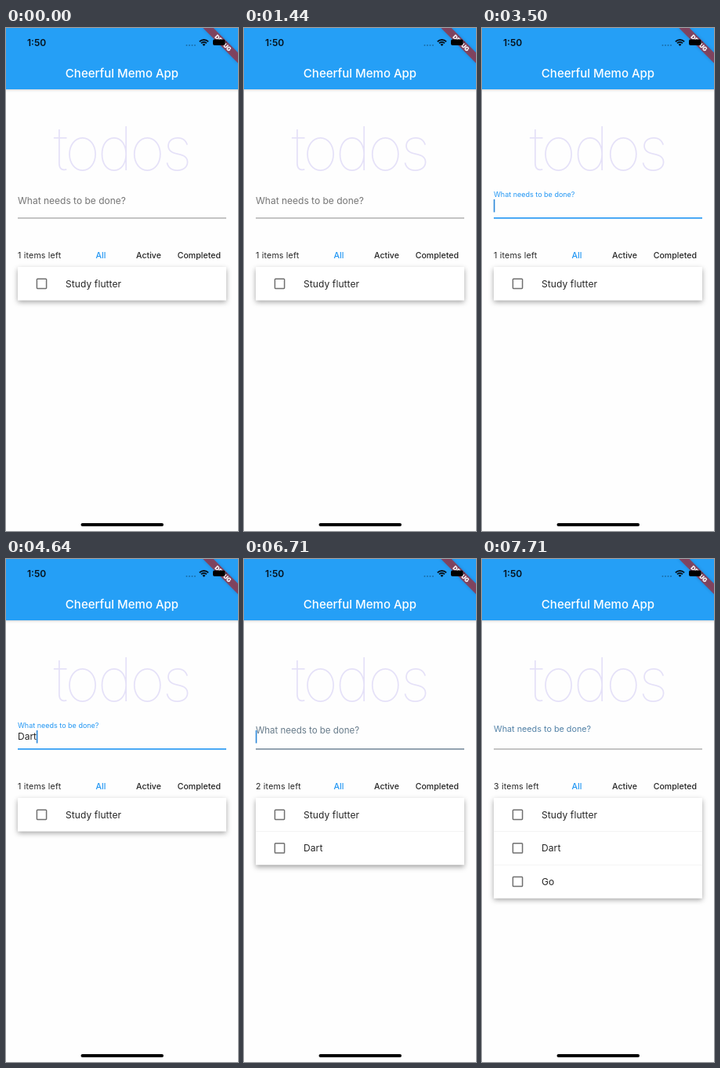
Write an HTML page with a canvas that moves like this. It is 296 px wide and 640 px high and loops after 8000 ms.

```html
<!DOCTYPE html>
<html lang="en">
<head>
<meta charset="utf-8">
<title>Todo list</title>
<style>
  html, body { margin: 0; width: 100%; height: 100%; overflow: hidden; }
  canvas { display: block; width: 296px; height: 640px; }
</style>
</head>
<body>
<canvas id="stage" width="296" height="640"></canvas>
<script>
const ctx = document.getElementById('stage').getContext('2d');
const LOOP = 8000, LEFT = 15, RIGHT = 281, ROW = 42.6, LIST_TOP = 304;
const BLUE = '#2196f3', BAR = '#259ff6', INK = '#252525';
const tasks = ['Study flutter', 'Dart', 'Go'];

// Stepped tracks: [start time, value held until the next entry]
const taskCount = [[0, 1], [500, 0], [1440, 1], [5010, 2], [7600, 3]];
const focused = [[0, 0], [2200, 1], [5010, 0], [6710, 1], [7600, 0]];
const labelLift = [[0, 0], [2200, .36], [2310, .92], [2780, 1], [5010, .5], [5130, 0],
                   [6710, .17], [6820, .74], [7110, 1], [7600, .9], [7710, .4]];
const caretAlpha = [[0, 0], [2200, 1], [2780, .7], [2890, .35], [2990, 0], [3290, .3],
                    [3400, .65], [3500, 1], [3800, .7], [3910, .35], [4010, 0], [4270, 1],
                    [5010, 0], [6710, 1], [7600, 0]];
const typed = [[0, ''], [4270, 'Da'], [4430, 'Dar'], [4640, 'Dart'], [5010, ''],
               [7110, 'G'], [7360, 'Go'], [7600, '']];

const at = (track, t) => track.findLast(([start]) => start <= t)[1];
const clamp = v => Math.min(1, Math.max(0, v));

// Grey to blue
function focusColor(grey, k) {
  return `rgb(${[33, 150, 243].map(v => Math.round(grey + (v - grey) * k)).join()})`;
}

function box(x, y, w, h, color) {
  ctx.fillStyle = color;
  ctx.fillRect(x, y, w, h);
}

function pill(x, y, w, h, r, color) {
  ctx.fillStyle = color;
  ctx.beginPath();
  ctx.roundRect(x, y, w, h, r);
  ctx.fill();
}

function text(str, x, y, size, color, { weight = 400, align = 'left', spacing = 0 } = {}) {
  ctx.font = `${weight} ${size}px Inter, sans-serif`;
  ctx.letterSpacing = spacing + 'px';
  ctx.textAlign = align;
  ctx.fillStyle = color;
  ctx.fillText(str, x, y);
}

function withShadow(color, blur, dy, draw) {
  ctx.save();
  Object.assign(ctx, { shadowColor: color, shadowBlur: blur, shadowOffsetY: dy });
  draw();
  ctx.restore();
}

// cubic-bezier(.4, 0, .2, 1)
function fastOutSlowIn(x) {
  let lo = 0, hi = 1;
  for (let i = 0; i < 20; i++) {
    const s = (lo + hi) / 2, r = 1 - s;
    if (1.2 * r * r * s + .6 * r * s * s + s ** 3 < x) lo = s; else hi = s;
  }
  return lo * lo * (3 - 2 * lo);
}

function drawHeader() {
  withShadow('rgba(0,0,0,.18)', 3, 1, () => box(-10, -10, 316, 88, BAR));
  text('Cheerful Memo App', 148, 62.5, 15, '#fff', { weight: 500, align: 'center' });

  ctx.save();
  ctx.translate(296, 0);
  ctx.rotate(Math.PI / 4);
  withShadow('rgba(0,0,0,.25)', 4, 0, () => box(-31.6, 22.1, 63.2, 9.5, 'rgba(183,28,28,.63)'));
  text('DEBUG', 0, 29.7, 7.6, '#fff', { weight: 900, align: 'center' });
  ctx.restore();
}

function drawStatusBar() {
  text('1:50', 27, 23.2, 12, '#06121d', { weight: 600 });
  for (let i = 0; i < 4; i++) pill(229.5 + i * 3.5, 21, 2, 2, 1, 'rgba(0,0,0,.3)');

  ctx.strokeStyle = ctx.fillStyle = '#06121d';
  ctx.lineWidth = 1.8;
  for (const r of [8, 5]) {
    ctx.beginPath();
    ctx.arc(252.5, 23, r, -Math.PI * .75, -Math.PI * .25);
    ctx.stroke();
  }
  ctx.beginPath();
  ctx.moveTo(252.5, 23);
  ctx.arc(252.5, 23, 2.8, -Math.PI * .75, -Math.PI * .25);
  ctx.fill();

  pill(264, 14.5, 15.5, 7.5, 2, '#000');
  pill(280.3, 17, 1.2, 2.8, .6, 'rgba(0,0,0,.5)');
}

function drawField(t) {
  const lift = at(labelLift, t), value = at(typed, t), focus = at(focused, t);
  text('What needs to be done?', LEFT, 224 - 9 * lift, 12 * (1 - lift / 4), focusColor(117, lift));
  box(LEFT, 241.4 - focus * .4, RIGHT - LEFT, 1 + focus * .6, focusColor(140, focus * lift));

  text(value, LEFT, 230.3, 12, INK);
  const caretX = LEFT + (value ? ctx.measureText(value).width : 0);
  ctx.globalAlpha = at(caretAlpha, t);
  box(caretX - .2, 218, 1.6, 16.4, '#2c88d9');
  ctx.globalAlpha = 1;
}

function drawFilters(count) {
  text(`${count} items left`, LEFT, 292.8, 10.6, INK, { spacing: .2 });
  const option = { weight: 500, align: 'center' };
  text('All', 121, 292.8, 10.6, BLUE, option);
  text('Active', 182, 292.8, 10.6, INK, option);
  text('Completed', 246.3, 292.8, 10.6, INK, option);
}

function drawSpinner(ms) {
  const cycle = ms / 1333;
  const head = fastOutSlowIn(clamp(cycle * 2));
  const tail = fastOutSlowIn(clamp(cycle * 2 - 1));
  const start = Math.PI * (-.5 + 1.5 * tail + 2 * ms / 2222 + .5 * cycle);
  ctx.strokeStyle = BLUE;
  ctx.lineWidth = 3.1;
  ctx.beginPath();
  ctx.arc(147.7, 317.6, 14, start, start + Math.max(.03, Math.PI * 1.5 * (head - tail)));
  ctx.stroke();
}

function drawList(count) {
  withShadow('rgba(0,0,0,.36)', 6.5, 2.5,
    () => box(LEFT, LIST_TOP, RIGHT - LEFT, count * ROW, '#fff'));
  tasks.slice(0, count).forEach((task, i) => {
    const top = LIST_TOP + i * ROW;
    if (i) box(LEFT, top - .5, RIGHT - LEFT, 1, '#f3f3f3');
    ctx.strokeStyle = '#707070';
    ctx.lineWidth = 1.5;
    ctx.beginPath();
    ctx.roundRect(39.4, top + 15.2, 12.2, 12.2, .8);
    ctx.stroke();
    text(task, 76, top + 25.6, 12, INK, { spacing: .1 });
  });
}

function draw(t) {
  const count = at(taskCount, t);
  box(0, 0, 296, 640, '#fefefe');
  drawHeader();
  drawStatusBar();
  text('todos', 147.3, 181, 77, '#e5e1f8', { weight: 100, align: 'center', spacing: -3.3 });
  drawField(t);
  drawFilters(count);
  if (count) drawList(count);
  else drawSpinner(Math.min(7, Math.floor((t - 500) / 110)) * 110);
  pill(95.5, 630, 105.5, 4, 2, '#000');
}

function tick() {
  draw(performance.now() % LOOP);
  requestAnimationFrame(tick);
}
tick();
</script>
</body>
</html>
```
